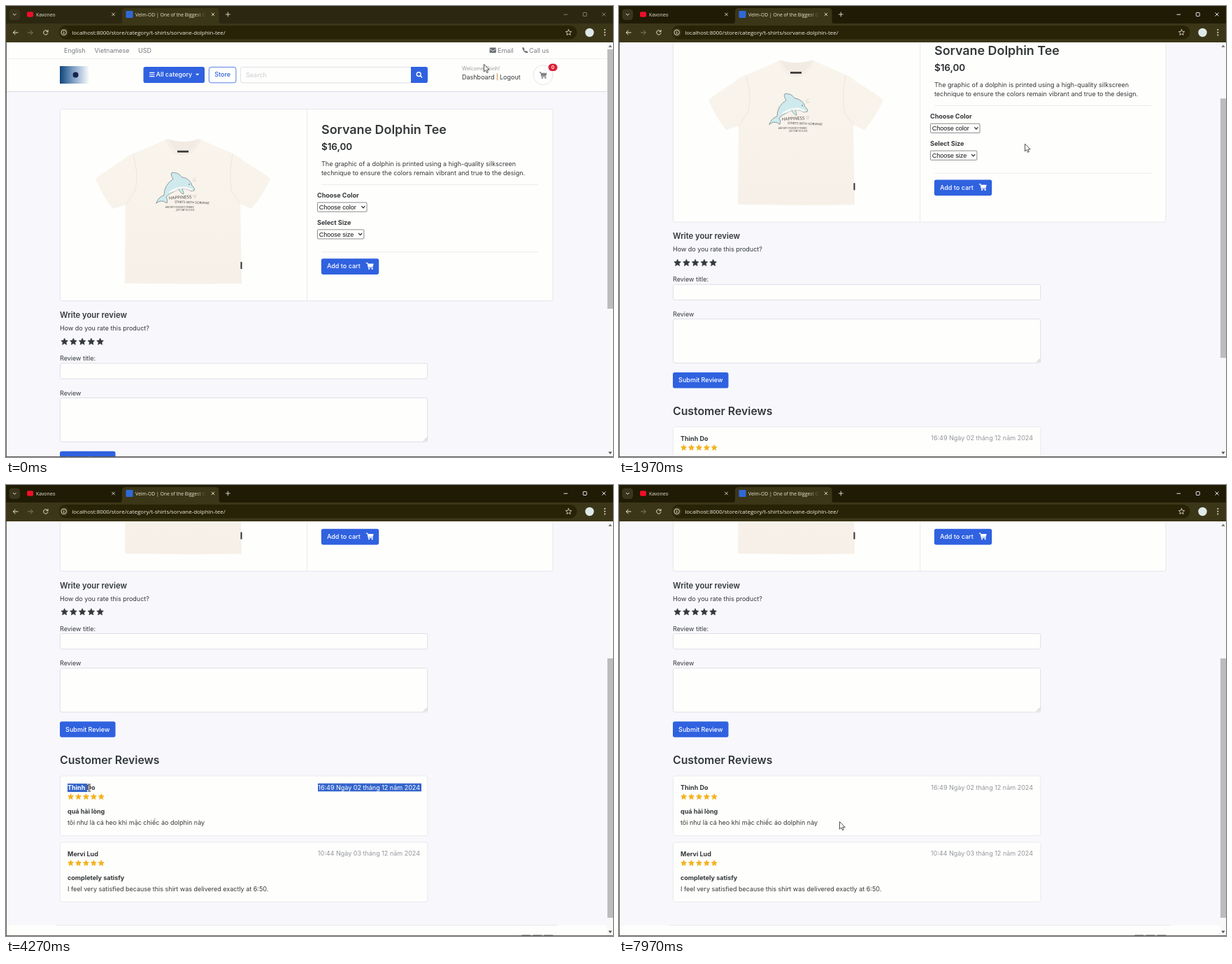
An HTML page that plays this animation: 868 by 645 pixels, repeating every 8 s.

```html
<!DOCTYPE html>
<html lang="en">
<head>
<meta charset="utf-8">
<title>Product page</title>
<style>
  html, body { margin: 0; width: 100%; height: 100%; overflow: hidden; background: #f8f8fc; }
  svg { display: block; }
  text { white-space: pre; font-optical-sizing: none; }
  .web { font-family: Inter, sans-serif; }
  .ui { font-family: "Open Sans", "Noto Sans", sans-serif; }
  .form { font-family: "Liberation Sans", Arial, sans-serif; }
</style>
</head>
<body>
<svg id="stage" xmlns="http://www.w3.org/2000/svg" width="868" height="645" viewBox="0 0 868 645"></svg>
<script>
const LOOP = 8000, MAX_SCROLL = 298.5;
const INK = '#343839', GREY = '#777b80', BLUE = '#3062e0', PICK = '#3466cc', LINE = '#d6d9e2', CARD = '#fefefc';
const BODY = 9;

// Text is placed by the middle of its capitals.
const text = (x, mid, str, { size = BODY, fill = INK, weight = 400, anchor = 'start', cls = 'web' } = {}) =>
  `<text class="${cls}" x="${x}" y="${mid + size * 0.36}" font-size="${size}" font-weight="${weight}" fill="${fill}" text-anchor="${anchor}">${str}</text>`;
const box = (x, y, w, h, fill, { r = 0, line = 'none' } = {}) =>
  `<rect x="${x}" y="${y}" width="${w}" height="${h}" rx="${r}" fill="${fill}" stroke="${line}" stroke-width=".8"/>`;
const path = (d, stroke, width = 1, fill = 'none') =>
  `<path d="${d}" fill="${fill}" stroke="${stroke}" stroke-width="${width}" stroke-linecap="round" stroke-linejoin="round"/>`;
const shape = (d, fill) => `<path d="${d}" fill="${fill}"/>`;
const dot = (x, y, r, fill, line = 'none') =>
  `<circle cx="${x}" cy="${y}" r="${r}" fill="${fill}" stroke="${line}" stroke-width=".8"/>`;

function star(x, y, r, fill) {
  const pts = Array.from({ length: 10 }, (_, i) => {
    const a = i * Math.PI / 5 - Math.PI / 2, k = i % 2 ? r * 0.47 : r;
    return `${(x + k * Math.cos(a)).toFixed(2)},${(y + k * Math.sin(a)).toFixed(2)}`;
  });
  return `<polygon points="${pts.join(' ')}" fill="${fill}" stroke="${fill}" stroke-width=".8" stroke-linejoin="round"/>`;
}
const stars = (x, y, step, r, fill) => [0, 1, 2, 3, 4].map(i => star(x + i * step, y, r, fill)).join('');

const cart = (x, y, fill) => `<g transform="translate(${x} ${y})">` +
  path('M-5 -4.2H-3.3L-1.9 2.2H4', fill, 1.2) + shape('M-3 -3.2H5.4L4.3 1.1H-2.1Z', fill) +
  dot(-1.2, 4, 1.1, fill) + dot(3.4, 4, 1.1, fill) + '</g>';

// A highlighted stretch: clips its own white copy of the text.
const selection = (id, x, y, w, h, content) =>
  `<svg id="${id}" x="${x}" y="${y}" width="${w}" height="${h}" viewBox="${x} ${y} ${w} ${h}" preserveAspectRatio="none">` +
  box(x, y, w, h, PICK) + content + '</svg>';

const welcome = fill => text(652, 89.5, 'Welcome Thinh!', { size: 7.1, fill });
const reviewer = fill => text(88, 731.5, 'Thinh Do', { weight: 700, fill });
const posted = fill => text(592, 731, '16:49 Ngày 02 tháng 12 năm 2024', { fill, anchor: 'end' });

function header() {
  return box(0, 52, 860, 70.5, CARD) + box(0, 75, 860, .8, '#ebebef') + box(0, 122, 860, .9, '#d5d7e2') +
    text(83, 63.3, 'English', { fill: GREY }) + text(126.5, 63.3, 'Vietnamese', { fill: GREY }) + text(189, 63.3, 'USD', { fill: GREY }) +
    box(691.5, 59.6, 9.3, 7.4, '#6a6e73', { r: 1 }) + path('M692 61.6L696.1 64.6L700.3 61.6', '#fff', .8) +
    text(703, 63.3, 'Email', { fill: GREY }) +
    path('M739.8 60.4Q739.8 65.6 745 66.4', '#6a6e73', 1.4) + path('M739.4 60.2L740.4 62M743.4 65.2L745.2 66', '#6a6e73', 2.3) +
    text(748, 63.3, 'Call us', { fill: GREY }) +
    box(77, 86, 42, 25, 'url(#banner)') + dot(99.5, 98.5, 4, '#16244f') +
    box(196.5, 87, 87.5, 23, BLUE, { r: 2.8 }) + path('M205.5 95.3H212M205.5 98H212M205.5 100.7H212', '#fff', 1.2) +
    text(214.5, 98, 'All category', { fill: '#fff', weight: 500 }) + shape('M271 96.8H276.4L273.7 99.6Z', '#fff') +
    box(290.3, 87.4, 38.6, 22.4, CARD, { r: 2.8, line: BLUE }) + text(309.7, 98, 'Store', { fill: BLUE, weight: 500, anchor: 'middle' }) +
    box(335.4, 87.4, 246, 22.4, CARD, { r: 2.8, line: LINE }) + text(343, 98.3, 'Search', { fill: '#c9ccd2' }) +
    shape('M579 87H600.2Q603 87 603 89.8V107.2Q603 110 600.2 110H579Z', BLUE) +
    `<circle cx="590.2" cy="97.6" r="2.9" fill="none" stroke="#fff" stroke-width="1.4"/>` + path('M592.5 99.9L594.6 102', '#fff', 1.6) +
    welcome('#9a9a9a') + selection('pickName', 684, 84, 20, 11, welcome('#fff')) +
    text(652, 101.3, 'Dashboard') + box(701.9, 96.3, 1, 10, '#d98a3a') + text(706, 101.3, 'Logout') +
    dot(768, 98.5, 14, CARD, '#dcdde3') + cart(768, 99, '#7f8388') +
    box(775.5, 82.5, 13, 10.4, '#dc2038', { r: 5.2 }) + text(782, 87.8, '0', { size: 6.7, fill: '#fff', weight: 600, anchor: 'middle' });
}

function shirt() {
  const print = { fill: '#3a3a38', cls: 'ui', weight: 500 };
  return shape('M231 190Q253 198 276 190L322 210Q334 215 340 222Q360 233 378 247Q368 270 351 290L335 283L337 397Q254 398 170 396.5L171 284L153 290Q137 270 128 247Q148 232 166 221Q173 213 188 209Z', 'url(#cloth)') +
    shape('M231 190Q253 198 276 190Q268 211 253 211Q239 210 231 190Z', '#f1ebe3') +
    path('M229 191Q237 213 253 213Q270 213 278 191', '#e7dfd6', .7) +
    path('M182 213Q190 240 185 263L171 285M324 212Q318 242 323 266L335 283', '#e6dfd7', .7) +
    box(245, 206.8, 16, 2.7, '#3a3835') + box(335.5, 366, 2, 10, '#33312f') +
    path('M215 282Q217 274 226 270.5Q226 256 239 247.5Q235 241 237 238.5Q246 237 251 244.5Q264 247 266 257Q271 261 269 264Q265 266 259 262Q249 260 241 265Q233 268 229 273Q232 278 230 282Q225 278 221 279Q218 279.5 215 282Z', '#68777b', .7, '#cfeaed') +
    shape('M233 266Q244 257 258 258.5Q264 260 268 263.5Q264 265 259 262Q249 260 241 265Q237 266 233 268Z', '#f6f8f5') +
    path('M247 261.5Q249 268 254 269Q254 265 252 261.5', '#68777b', .6, '#cfeaed') +
    dot(262, 255, .7, '#333') + path('M267 249L271 246M268 251L272 250', '#999', .4) +
    `<g transform="rotate(-3 233 276)">${text(233, 274.5, 'HAPPINESS ♡', { ...print, size: 6.2 })}</g>` +
    `<g transform="rotate(2 241 281)">${text(241, 280, 'STARTS WITH SORVANE', { ...print, size: 4.6 })}</g>` +
    text(228, 287.8, 'AND WITH YOUR BEST FRIENDS', { ...print, size: 2.8 }) +
    text(243, 291.6, 'JUST STAY SO CLOSE', { ...print, size: 2.8 });
}

const dropdown = (y, w, label) => box(445.4, y - 6.6, w, 13.2, '#fff', { r: 1, line: '#6f6f6f' }) +
  text(447.8, y, label, { cls: 'form', fill: '#111' }) + path(`M${438 + w} ${y - 1.2}l2.2 2.4l2.2 -2.4`, '#222', 1.2);

function product() {
  return box(77.4, 147.4, 704.6, 274.4, CARD, { r: 2.8, line: '#dfe0e8' }) + box(430, 148, .8, 273.5, '#e8e8ee') + shirt() +
    text(451, 176.2, 'Sorvane Dolphin Tee', { size: 17.9, weight: 600 }) +
    text(451, 201.3, '$16,00', { size: 13.4, weight: 600, fill: '#26292b' }) +
    text(451, 225.8, 'The graphic of a dolphin is printed using a high-quality silkscreen') +
    text(451, 239, 'technique to ensure the colors remain vibrant and true to the design.') +
    box(451, 255, 310, .8, '#e8e8ec') +
    text(445, 270.3, 'Choose Color', { weight: 700 }) + dropdown(287.6, 70.6, 'Choose color') +
    text(445, 309.3, 'Select Size', { weight: 700 }) + dropdown(326.4, 66.4, 'Choose size') +
    box(451, 351.5, 310, .8, '#e8e8ec') +
    box(450.8, 361.3, 82.4, 22.6, BLUE, { r: 2.8 }) + text(459, 372.1, 'Add to cart', { fill: '#fff', weight: 500 }) + cart(520.3, 371.8, '#fff');
}

const reviewCard = (y, who, date, title, body) => box(77.4, y, 525.4, 85.5, CARD, { r: 2.8, line: '#e4e5ed' }) +
  who + date + stars(92.6, y + 30, 10.9, 4.2, '#f4b11f') +
  text(88, y + 50.4, title, { weight: 700 }) + text(88, y + 67.2, body);

function reviews() {
  return text(77, 442, 'Write your review', { size: 11.3, weight: 600 }) +
    text(77, 460.8, 'How do you rate this product?') + stars(83.6, 480.2, 12.75, 5, INK) +
    text(77, 503.8, 'Review title:') + box(77.4, 511, 525.4, 22.2, CARD, { r: 2.8, line: LINE }) +
    text(77, 553.3, 'Review') + box(77.4, 560.4, 525.4, 63, CARD, { r: 2.8, line: LINE }) +
    path('M597.5 622L602 617.5M600 622L602 620', '#8a8a8a', .6) +
    box(77, 636.7, 79.5, 22.6, BLUE, { r: 2.8 }) + text(116.8, 647.8, 'Submit Review', { fill: '#fff', weight: 500, anchor: 'middle' }) +
    text(77, 691.8, 'Customer Reviews', { size: 15.8, weight: 600 }) +
    reviewCard(714.5, reviewer(INK), posted('#92969b'), 'quá hài lòng', 'tôi như là cá heo khi mặc chiếc áo dolphin này') +
    reviewCard(809.4, text(88, 826.2, 'Mervi Lud', { weight: 700 }), text(592, 825.7, '10:44 Ngày 03 tháng 12 năm 2024', { fill: '#92969b', anchor: 'end' }),
      'completely satisfy', 'I feel very satisfied because this shirt was delivered exactly at 6:50.') +
    selection('pickReviewer', 88, 725.5, 28, 12, reviewer('#fff')) +
    selection('pickDate', 446, 725, 148, 12, posted('#fff')) +
    box(0, 928, 860, 30, CARD) + box(72, 927.5, 716, .8, '#e0e2e4') +
    [737, 753, 769].map(x => box(x, 941.8, 13.5, 8, '#8d9094', { r: 1 })).join('');
}

function browser() {
  const pale = '#e9e5d3', cross = (x, y, k) => `M${x - k} ${y - k}L${x + k} ${y + k}M${x + k} ${y - k}L${x - k} ${y + k}`;
  const tab = { cls: 'ui', size: 6.8, fill: pale };
  return '<rect id="strip" width="868" height="26"/>' + box(0, 25, 868, 27, '#3c3618') +
    box(4.5, 4.5, 15.5, 15.5, '#3a351c', { r: 4.5 }) + path('M10.3 11.3L12.3 13.3L14.3 11.3', pale, 1) +
    box(30, 8.3, 9, 7.4, '#f00f2b', { r: 2 }) + text(43, 12.2, 'Kavoneo', tab) + path(cross(153.5, 12, 1.9), pale, .9) +
    shape('M161 26Q166 26 166 21V8Q166 3 171 3H299.5Q304.5 3 304.5 8V21Q304.5 26 309.5 26Z', '#3c3618') +
    box(171.5, 7, 10, 10, '#2f69d8', { r: 1 }) +
    `<svg x="185" y="3" width="101" height="20" viewBox="185 3 101 20">${text(185, 12.2, 'Velm-OD | One of the Biggest Collections', tab)}</svg>` +
    box(270, 4, 17, 20, 'url(#fade)') +
    path(cross(296, 12, 1.9), pale, .9) + path('M314.3 12H320.3M317.3 9V15', pale, .9) +
    `<g id="controls" fill="none" stroke-width=".9"><path d="M797.5 12.2H803"/><rect x="825.3" y="9.5" width="5" height="5" rx=".8"/><path d="${cross(855, 12, 2.5)}"/></g>` +
    path('M17 38H10.5M13.3 35L10.3 38L13.3 41', pale, 1) + path('M31.5 38H38M35.2 35L38.2 38L35.2 41', '#827d65', 1) +
    path('M59.6 36.2A3.2 3.2 0 1 0 60 38.8M60 34.6V36.8H57.8', pale, 1) +
    box(75.5, 28, 741, 19.5, '#282307', { r: 9.7 }) + dot(82.7, 37.8, 6.3, '#3c3618') +
    `<circle cx="82.7" cy="37.8" r="3.7" fill="none" stroke="${pale}" stroke-width=".9"/>` + path('M82.7 37.5V39.6M82.7 36V36.1', pale, .9) +
    text(94.3, 37.9, 'localhost:8000/store/category/t-shirts/sorvane-dolphin-tee/', { cls: 'ui', size: 7.95, fill: '#f2efe2' }) +
    path('M804.5 33.7L805.7 36.4L808.7 36.7L806.4 38.6L807.1 41.5L804.5 39.9L801.9 41.5L802.6 38.6L800.3 36.7L803.3 36.4Z', pale, .8) +
    dot(834.5, 38, 6.2, '#dfe9e8') + [34, 37.8, 41.6].map(y => dot(856.3, y, 1, pale)).join('') +
    box(859.3, 52, 8.7, 593, '#f8f8f8') + '<rect id="thumb" x="860" width="8" height="371" fill="#bcbcbc"/>' +
    shape('M861.4 59L864 55.6L866.6 59Z', '#777') + shape('M861.4 637.5L864 641L866.6 637.5Z', '#505050') +
    box(0, 52, .9, 593, '#55514a') + box(0, 644.1, 868, .9, '#55514a');
}

const stop = (at, colour, alpha = 1) => `<stop offset="${at}" stop-color="${colour}" stop-opacity="${alpha}"/>`;
const stage = document.getElementById('stage');
stage.innerHTML = `<defs>
  <linearGradient id="banner">${stop(0, '#0f4679')}${stop(.45, '#7d9ec4')}${stop(1, '#fdfdfe')}</linearGradient>
  <linearGradient id="cloth" x2="0" y2="1">${stop(0, '#f9f4ec')}${stop(1, '#f6f0e8')}</linearGradient>
  <linearGradient id="fade">${stop(0, '#3c3618', 0)}${stop(1, '#3c3618')}</linearGradient>
</defs>` + box(0, 0, 868, 645, '#f8f8fc') +
  `<g id="page">${header()}${product()}${reviews()}</g>` + browser() +
  `<g id="arrow">${path('M0 0V10.2L2.4 8L4.1 11.7L5.8 10.9L4.2 7.4H7.3Z', '#222', .8, '#fff')}</g>` +
  `<g id="beam">${path('M-2 -5H2M-2 5H2M0 -5V5', '#fff', 2)}${path('M-2 -5H-.6L0 -4.5L.6 -5H2M-2 5H-.6L0 4.5L.6 5H2M0 -4.5V4.5', '#222', .9)}</g>`;

const [page, thumb, strip, controls, arrow, beam, pickName, pickReviewer, pickDate] =
  ['page', 'thumb', 'strip', 'controls', 'arrow', 'beam', 'pickName', 'pickReviewer', 'pickDate'].map(id => document.getElementById(id));

// time, x, y, text cursor
const pointer = [
  [0, 683.5, 83.8, 0], [250, 683.5, 83.8, 0], [450, 686, 90, 1], [650, 684, 90, 1], [1050, 704, 90, 1],
  [1330, 704, 90, 0], [1700, 583, 197, 0], [1950, 583, 197, 0], [2450, 103.5, 309.5, 1], [2800, 103.5, 309.5, 0],
  [3400, 88, 433, 1], [3600, 88, 433, 1], [4150, 119, 433, 1], [4800, 119, 433, 1], [5500, 101, 485, 1],
  [6100, 101, 485, 1], [7000, 284, 485, 0], [7400, 315.5, 482, 0], [8000, 315.5, 482, 0]
];
const wheel = [[0, 0], [1700, 0], [1870, 69], [2400, MAX_SCROLL], [8000, MAX_SCROLL]];
const smooth = u => u * u * (3 - 2 * u);

function sample(keys, t, ease = u => u) {
  const i = Math.max(1, keys.findIndex(k => k[0] > t)), a = keys[i - 1], b = keys[i];
  const u = ease((t - a[0]) / (b[0] - a[0]));
  return { x: a[1] + (b[1] - a[1]) * u, y: a[2] + (b[2] - a[2]) * u, isText: a[3] };
}
const show = (el, on) => el.setAttribute('visibility', on ? 'visible' : 'hidden');
function widen(el, w) {
  const [x, y, , h] = el.getAttribute('viewBox').split(' ');
  el.setAttribute('width', w);
  el.setAttribute('viewBox', `${x} ${y} ${w} ${h}`);
}

function draw(t) {
  const scroll = sample(wheel, t).x;
  page.setAttribute('transform', `translate(0 ${-scroll})`);
  thumb.setAttribute('y', 62 + scroll * 0.623);

  const focused = t >= 650;
  strip.setAttribute('fill', focused ? '#201b05' : '#2c2710');
  controls.setAttribute('stroke', focused ? '#fff' : '#918c76');

  const { x, y, isText } = sample(pointer, t, smooth);
  for (const el of [arrow, beam]) el.setAttribute('transform', `translate(${x} ${y})`);
  show(arrow, !isText);
  show(beam, isText);

  show(pickName, t > 680 && t < 1600);
  widen(pickName, Math.min(20, Math.max(.5, t < 1050 ? x - 684 : 20)));
  const reading = t > 3640 && t < 4800;
  show(pickReviewer, reading);
  show(pickDate, reading);
  widen(pickReviewer, Math.min(28, Math.max(.5, x - 88)));
}

const start = performance.now();
(function tick() {
  draw((performance.now() - start) % LOOP);
  requestAnimationFrame(tick);
})();
</script>
</body>
</html>
```
